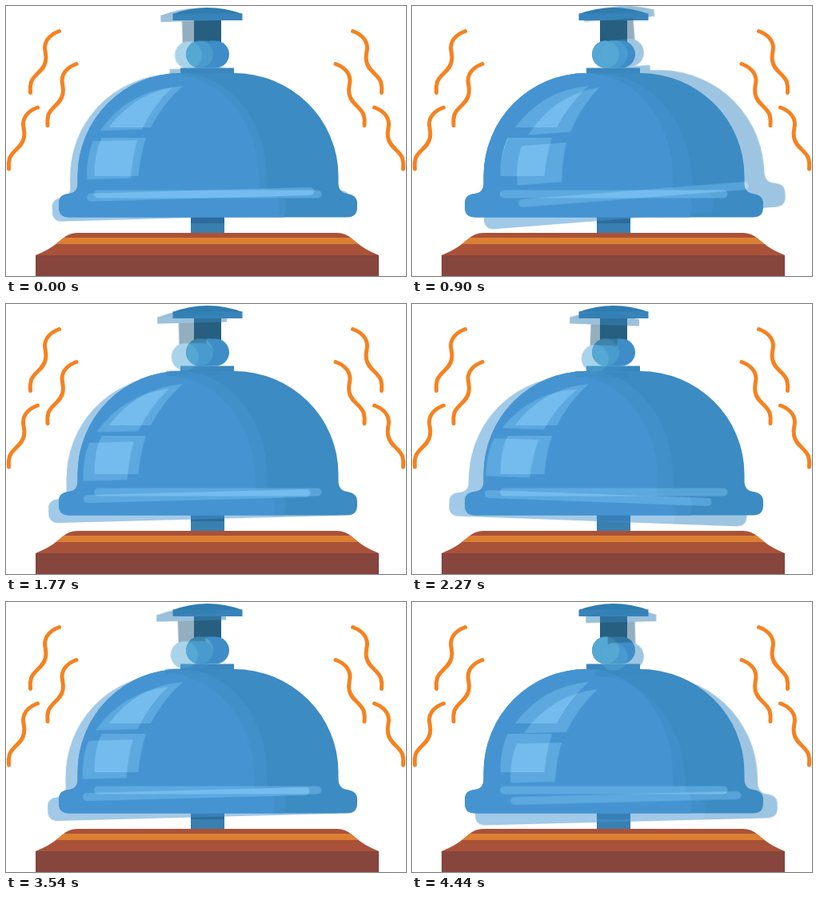
Animation of 500x338 px, one loop 5010 ms. Source, as an HTML page:

```html
<!DOCTYPE html>
<html lang="en">
<head>
<meta charset="utf-8">
<title>Ringing bell</title>
<style>
  html, body { margin: 0; width: 100%; height: 100%; overflow: hidden; background: #fff; }
  svg { display: block; width: 100%; height: 100%; }
  #echo { opacity: .5; transform-box: view-box; transform-origin: 252.5px 235.5px; }
  .waves { fill: none; stroke: #f58220; stroke-width: 5; stroke-linecap: round; }
</style>
</head>
<body>
<svg viewBox="0 0 500 338">
  <defs>
    <path id="wave" d="M66.500 31.500C57 35 49 42 48.500 52C48.500 58 51 61 49.500 69C47 82 36 84 31.500 95C30 100 30 104 30.500 108.500"/>
    <g id="waves">
      <use href="#wave"/>
      <use href="#wave" x="21.500" y="41"/>
      <use href="#wave" x="-27" y="95.500"/>
    </g>
    <path id="shell" d="M89.500 213A128.500 129 0 0 1 218 84H285A130.500 129 0 0 1 415.500 213V222Q416 234 427 235Q439 237 439 247V252Q439 264.500 426 264.500H79Q66 264.500 66 252V247Q66 236 78 235Q89.500 234 89.500 222Z"/>
    <clipPath id="inShell"><use href="#shell"/></clipPath>
    <clipPath id="slope">
      <path d="M37 312Q54 305 63 297.500L71 291Q79 284 89 284H414Q424 284 432 291L440 297.500Q449 305 466 312Z"/>
    </clipPath>
    <g id="bell">
      <path fill="#265f80" d="M235 17H269V46H235Z"/>
      <path fill="#2f7cb0" d="M208.500 10Q252 -6 295.500 10Z"/>
      <path fill="#3884ba" d="M208.500 9.500H295.500V18H208.500Z"/>
      <rect fill="#3e8dc8" x="225" y="43.500" width="54" height="34" rx="17"/>
      <circle fill="#55a8d3" cx="242" cy="60.500" r="17"/>
      <path fill="#3a87bf" d="M218 77.500H285V84.500H218Z"/>
      <use href="#shell" fill="#3c8bc3"/>
      <path clip-path="url(#inShell)" fill="#4594d1" d="M60 84H218A108 131 0 0 1 326 215V228Q326 234 338 235Q350 238 350 252L347 266H60Z"/>
      <g fill="#73bced">
        <path d="M221 100Q164 105 128.500 152H181Q197 121 221 100Z"/>
        <path d="M119.500 165H175Q168 186 165.500 213H110.500Q110 185 119.500 165Z"/>
        <rect x="110" y="230.500" width="284.500" height="10" rx="5"/>
      </g>
    </g>
  </defs>

  <g class="waves">
    <use href="#waves"/>
    <use href="#waves" transform="matrix(-1 0 0 1 500 0)"/>
  </g>

  <path fill="#397fb0" d="M231 264H273V285H231Z"/>
  <path fill="#2c6c9c" d="M231 264H273V272H231Z"/>
  <g clip-path="url(#slope)">
    <path fill="#a95239" d="M37 284H466V313H37Z"/>
    <path fill="#dd7f33" d="M37 290H466V298H37Z"/>
  </g>
  <path fill="#86453d" d="M37 312H466V338H37Z"/>

  <use href="#bell"/>
  <g id="echo"><use href="#bell"/></g>
</svg>
<script>
  const LOOP = 5010;

  // The few ways the echo leans: height and tilt
  const rest = { y: 0.3, tilt: -1.6 };
  const kick = { y: 1.2, tilt: 3.55 };
  const lift = { y: 0.5, tilt: -4.5 };
  const sag = { y: 5, tilt: -1.5 };
  const dip = { y: 7.5, tilt: 2.1 };
  const drop = { y: 10, tilt: -1.45 };

  // Beats in order: lean and sideways shift
  const beats = [
    [rest, -9], [kick, -20.5], [lift, 24.5], [lift, 30], [sag, -13.6], [dip, -19.5],
    [drop, 15], [lift, 24], [sag, -14.6], [kick, -28], [drop, 15]
  ];

  // Beats come in pairs 900 or 870 ms apart; the second of each pair follows after 400 ms
  const startOf = i => {
    if (i === 0) return 0;
    const pair = Math.floor((i - 1) / 2);
    return 500 + pair * 870 + Math.floor(pair / 2) * 30 + (i % 2 ? 0 : 400);
  };

  const frames = beats.map(([{ y, tilt }, x], i) => ({
    offset: startOf(i) / LOOP,
    transform: `translate(${x}px, ${y}px) rotate(${tilt}deg) scale(${x > 0 ? 1.013 : 0.998})`,
    easing: 'steps(1, end)'
  }));
  frames.push({ ...frames[frames.length - 1], offset: 1 });
  document.getElementById('echo').animate(frames, { duration: LOOP, iterations: Infinity });
</script>
</body>
</html>
```
